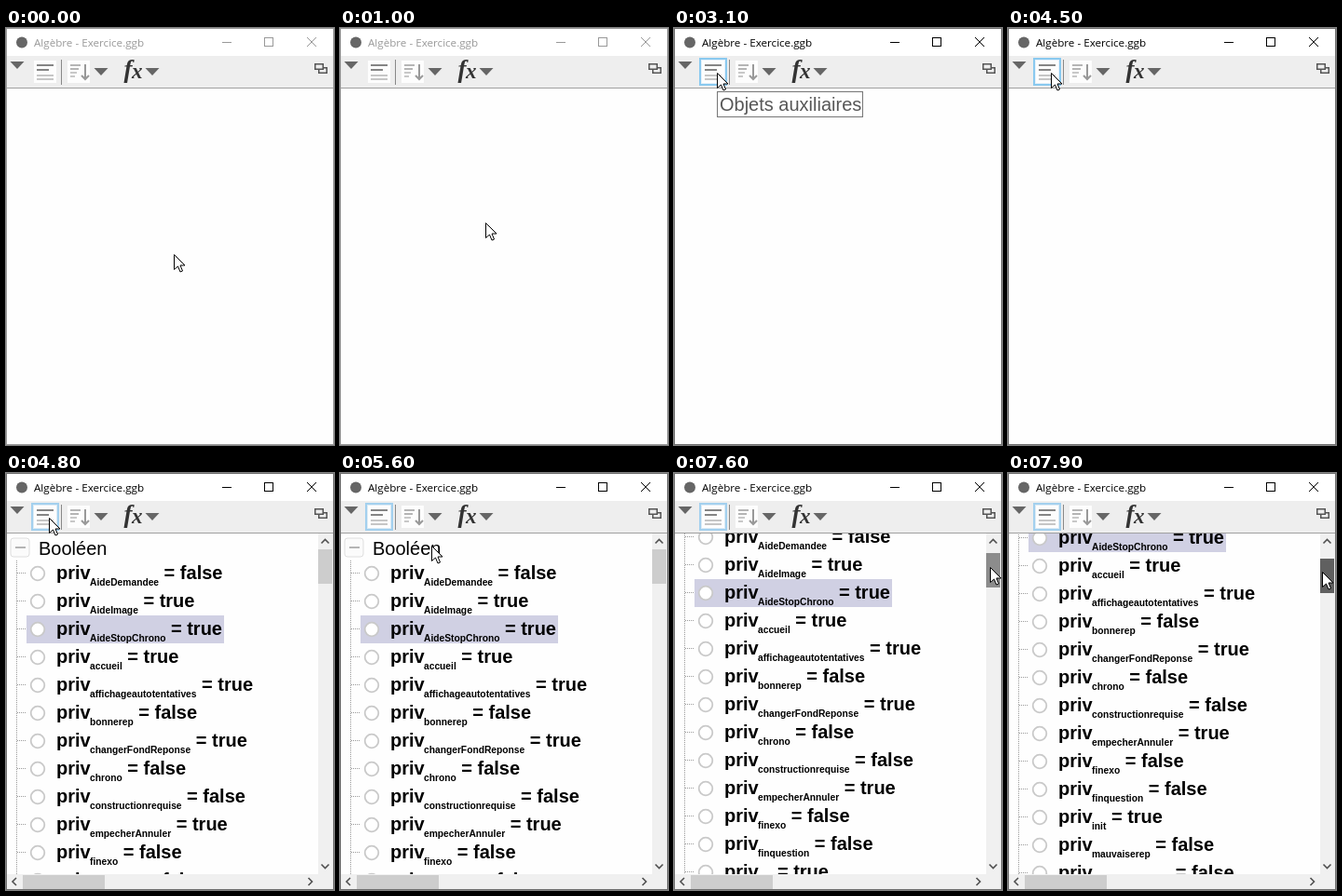
An HTML page with a canvas for the animation above (8 s loop, 352 px wide and 448 px high).

```html
<!DOCTYPE html>
<html lang="fr">
<head>
<meta charset="utf-8">
<title>Algèbre</title>
<style>
html, body { margin: 0; width: 100%; height: 100%; overflow: hidden; background: #fefefe; }
canvas { display: block; }
</style>
</head>
<body>
<canvas id="stage" width="352" height="448"></canvas>
<script>
const ctx = document.getElementById('stage').getContext('2d');
const LOOP = 8000, STEP = 100;
const SANS = '"Liberation Sans", Arial, sans-serif';

// Keys: [time, value, ...]
const POINTER = [
  [800, 180, 243], [1250, 126, 166], [1700, 79, 98], [1900, 65, 73], [2300, 46, 48],
  [5200, 46, 48], [5600, 98, 78], [6100, 210, 92], [7000, 337, 95],
  [7400, 337, 95], [7600, 339, 101], [7900, 337, 106]
];
const SCROLL = [[7400, 0], [7600, 39], [7900, 98]];
const THUMB_GREY = [[6900, 205], [7000, 194], [7200, 166], [7500, 160], [7600, 140], [7900, 96]];

const ROWS = [
  ['AideDemandee', false], ['AideImage', true], ['AideStopChrono', true],
  ['accueil', true], ['affichageautotentatives', true], ['bonnerep', false],
  ['changerFondReponse', true], ['chrono', false], ['constructionrequise', false],
  ['empecherAnnuler', true], ['finexo', false], ['finquestion', false],
  ['init', true], ['mauvaiserep', false], ['nouvellequestion', false]
];

function sample(keys, t) {
  if (t <= keys[0][0]) return keys[0].slice(1);
  for (let i = 1; i < keys.length; i++) {
    const a = keys[i - 1], b = keys[i];
    if (t <= b[0]) {
      const k = (t - a[0]) / (b[0] - a[0]);
      return a.slice(1).map((v, j) => v + (b[j + 1] - v) * k);
    }
  }
  return keys[keys.length - 1].slice(1);
}

function box(x, y, w, h, color) {
  ctx.fillStyle = color;
  ctx.fillRect(x, y, w, h);
}

function frame(x, y, w, h, color, line = 1) {
  ctx.strokeStyle = color;
  ctx.lineWidth = line;
  ctx.strokeRect(x + line / 2, y + line / 2, w - line, h - line);
}

function path(points, color, line = 1) {
  ctx.strokeStyle = color;
  ctx.lineWidth = line;
  ctx.beginPath();
  points.forEach(([x, y]) => ctx.lineTo(x, y));
  ctx.stroke();
}

function shape(points, color) {
  ctx.fillStyle = color;
  ctx.beginPath();
  points.forEach(([x, y]) => ctx.lineTo(x, y));
  ctx.closePath();
  ctx.fill();
}

function text(str, x, y, font, color = '#000') {
  ctx.font = font;
  ctx.fillStyle = color;
  ctx.fillText(str, x, y);
  return x + ctx.measureText(str).width;
}

function disc(x, y, r, fill, stroke, line) {
  ctx.beginPath();
  ctx.arc(x, y, r, 0, Math.PI * 2);
  ctx.fillStyle = fill;
  ctx.fill();
  if (stroke) {
    ctx.strokeStyle = stroke;
    ctx.lineWidth = line;
    ctx.stroke();
  }
}

function dropArrow(x, y) {
  shape([[x, y], [x + 15, y], [x + 7.5, y + 8]], '#666');
}

function titleBar(active) {
  const ink = active ? '#000' : '#999';
  box(0, 0, 352, 30, '#fff');
  disc(17, 15.5, 6, '#666');
  text('Algèbre - Exercice.ggb', 30, 20, '11.65px "Open Sans", "Noto Sans", sans-serif', ink);
  box(232, 15, 10, 1, ink);
  frame(277, 10, 10, 10, ink);
  path([[323, 10], [333, 20]], ink);
  path([[333, 10], [323, 20]], ink);
}

function auxButton(t) {
  if (t >= 4700) {
    box(27, 32, 30, 30, '#dcebf5');
    frame(27, 32, 30, 30, '#a3d0ee', 2);
  } else if (t >= 2200) {
    box(27, 32, 30, 30, '#e5f1fb');
    frame(27, 32, 30, 30, '#8ac9ef', 2);
  } else if (t >= 1800) {
    box(27, 32, 30, 30, '#e5f1fb');
    frame(27, 32, 30, 30, '#b9dcf5');
  }
  box(30, 35, 24, 24, '#fdfdfd');
  box(33, 39, 18, 2, '#858585');
  box(33, 44, 13, 2, '#858585');
  box(33, 50, 18, 2, '#c6c6c6');
  box(33, 54, 18, 2, '#c6c6c6');
}

function toolbar(t) {
  box(0, 30, 352, 34, '#eee');
  box(0, 64, 352, 1, '#a0a0a0');
  dropArrow(4.5, 36);
  auxButton(t);
  box(59, 34, 1, 27, '#888');
  box(66, 35, 24, 24, '#fdfdfd');
  [11, 9, 7, 5].forEach((w, i) => box(69, 39 + i * 4, w, 2, i < 2 ? '#b5b5b5' : '#c8c8c8'));
  box(84, 39, 2, 15, '#999');
  path([[81, 51], [85, 55], [89, 51]], '#999', 2);
  dropArrow(94.5, 43);
  const serif = '"Liberation Serif", "Times New Roman", serif';
  text('f', 126.5, 53, 'italic bold 27px ' + serif, '#333');
  text('x', 135, 54, 'italic bold 23px ' + serif, '#333');
  dropArrow(149.5, 43);
  frame(335, 42, 10, 7, '#555', 1.5);
  box(331, 38, 10, 7, '#eee');
  frame(331, 38, 10, 7, '#555', 1.5);
}

function row([name, value], i, scroll) {
  const y = 107.5 + i * 30 - scroll;
  if (name === 'AideStopChrono') box(22, y - 14.5, 212, 30, '#d0d0e3');
  ctx.setLineDash([1, 1]);
  path([[12, y], [22, y]], '#999');
  ctx.setLineDash([]);
  disc(34, y + 0.5, 7.3, '#fff', '#c9c9c9', 1.8);
  const bold = 'bold 20px ' + SANS;
  const base = y + 6.5;
  let x = text('priv', 54, base, bold);
  x = text(name, Math.min(x, 90), base + 6.5, 'bold 10.25px ' + SANS);
  text(' = ' + value, x, base, bold);
}

function list(scroll) {
  ctx.save();
  ctx.beginPath();
  ctx.rect(1, 65, 334, 366);
  ctx.clip();
  ctx.setLineDash([1, 1]);
  path([[11.5, 94 - scroll], [11.5, 560 - scroll]], '#999');
  ctx.setLineDash([]);
  ctx.beginPath();
  ctx.roundRect(5, 70 - scroll, 20, 20, 3);
  ctx.fillStyle = '#fbfbfb';
  ctx.fill();
  ctx.strokeStyle = '#dedede';
  ctx.lineWidth = 1;
  ctx.stroke();
  box(10, 79 - scroll, 11, 2, '#b5b5b5');
  text('Booléen', 35, 88 - scroll, '20px ' + SANS);
  ROWS.forEach((r, i) => row(r, i, scroll));
  ctx.restore();
}

function chevron(x, y, dx, dy) {
  // The tip points along (dx, dy)
  const bx = x - dx * 2, by = y - dy * 2, s = 4;
  path([[bx + dy * s, by + dx * s], [x + dx * 2, y + dy * 2], [bx - dy * s, by - dx * s]], '#505050', 1.6);
}

function scrollbars(t, scroll) {
  const grey = Math.round(sample(THUMB_GREY, t)[0]);
  box(335, 65, 16, 382, '#f0f0f0');
  box(1, 431, 350, 16, '#f0f0f0');
  box(335, 82 + Math.round(scroll * 0.1), 15, 37, `rgb(${grey},${grey},${grey})`);
  box(18, 432, 88, 15, '#cdcdcd');
  chevron(342.5, 73.5, 0, -1);
  chevron(342.5, 422.5, 0, 1);
  chevron(9, 439, -1, 0);
  chevron(326.5, 439, 1, 0);
}

function tooltip() {
  box(46, 68, 157, 28, '#fff');
  frame(46, 68, 157, 28, '#767676');
  text('Objets auxiliaires', 49, 89, '20px ' + SANS, '#575757');
}

function pointer(x, y) {
  ctx.save();
  ctx.translate(Math.round(x) + 0.5, Math.round(y) + 0.5);
  const outline = [[0, 0], [0, 16], [4, 12.5], [6.5, 18.5], [9, 17.5], [6.5, 11.5], [11.5, 11.5], [0, 0]];
  shape(outline, '#fff');
  path(outline, '#000');
  ctx.restore();
}

function draw(t) {
  const active = t >= 1800;
  const scroll = Math.round(sample(SCROLL, t)[0]);
  box(0, 0, 352, 448, '#fefefe');
  titleBar(active);
  toolbar(t);
  if (t >= 4700) {
    list(scroll);
    scrollbars(t, scroll);
  }
  frame(0, 0, 352, 448, active ? '#707070' : '#999');
  if (t >= 3100 && t < 4400) tooltip();
  pointer(...sample(POINTER, t));
}

const start = performance.now();
function tick() {
  const t = (performance.now() - start) % LOOP;
  draw(Math.floor(t / STEP) * STEP);
  requestAnimationFrame(tick);
}
tick();
</script>
</body>
</html>
```
